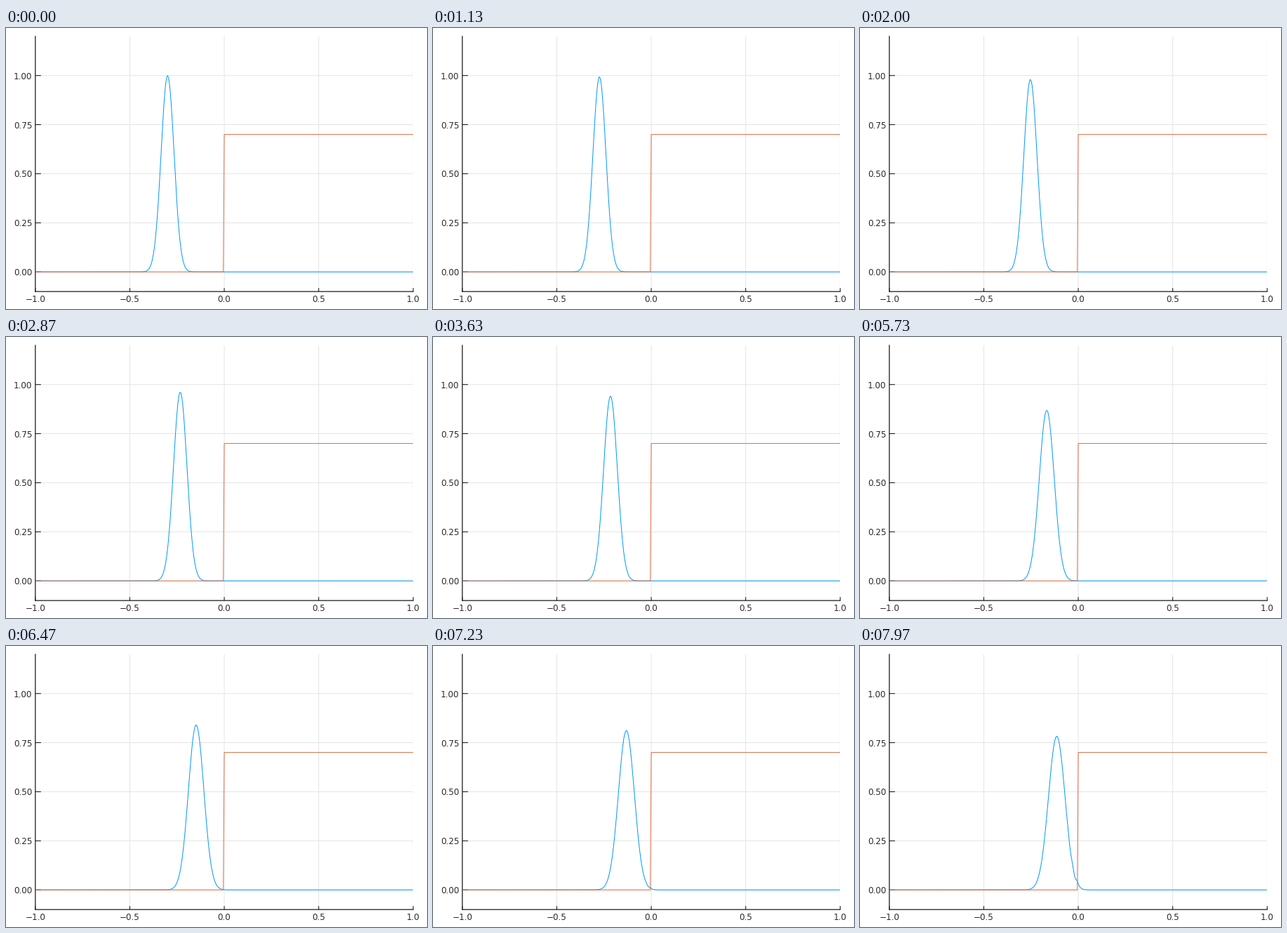
A matplotlib script for the animation above (8 s loop, 600 by 400 pixels).

```python
import numpy as np
import matplotlib.pyplot as plt
from matplotlib.animation import FuncAnimation

W, H, DPI = 600, 400, 100
FRAMES, LOOP = 240, 8000
PX = 72 / DPI                      # one pixel in points
LEFT, RIGHT, TOP, BOTTOM = 41.8, 580.3, 11.8, 375.15

BLUE, ORANGE, AXIS = "#009afa", "#e26f46", "#111111"

# Gaussian packet meeting a potential step (hbar = m = 1)
SIGMA, X0, K0 = 0.0484, -0.3, 100
EDGE = -0.0025                     # the step lies between two grid points
SPREAD_TIME = 10.02                # seconds until the width grows by sqrt(2)
x = np.linspace(-1, 1, 401)
k = np.linspace(0.2, 210, 700)
q = np.sqrt(k**2 - 0.7 * K0**2 + 0j)


def scattering_states():
    """Weighted stationary states, one column for each wave number."""
    d = (x - EDGE)[:, None]
    refl = (k - q) / (k + q)
    left = np.exp(1j * k * d) + refl * np.exp(-1j * k * d)
    right = (1 + refl) * np.exp(1j * q * np.maximum(d, 0))
    weight = np.exp(-((k - K0) * SIGMA) ** 2 / 2 - 1j * k * (X0 - EDGE))
    weight = weight * (k[1] - k[0]) * SIGMA / np.sqrt(2 * np.pi)
    return np.where(d < 0, left, right) * weight


states = scattering_states()


def density(seconds):
    t = SIGMA**2 * seconds / SPREAD_TIME
    return np.abs(states @ np.exp(-0.5j * k**2 * t)) ** 2


plt.rcParams["font.family"] = "DejaVu Sans"
plt.rcParams["path.snap"] = False
fig = plt.figure(figsize=(W / DPI, H / DPI), dpi=DPI, facecolor="white")
ax = fig.add_axes([LEFT / W, 1 - BOTTOM / H,
                   (RIGHT - LEFT) / W, (BOTTOM - TOP) / H])
ax.set(xlim=(-1, 1), ylim=(-0.1, 1.2))
ax.set_axisbelow(True)
ax.grid(color="#e5e5e5", linewidth=PX)

xticks = [-1, -0.5, 0, 0.5, 1]
yticks = [0, 0.25, 0.5, 0.75, 1]
ax.set_xticks(xticks, [f"{v:.1f}".replace("-", "\u2212") for v in xticks])
ax.set_yticks(yticks, [f"{v:.2f}" for v in yticks])
ax.tick_params(length=0, labelsize=12 * PX, labelcolor="#2a2a2a")
ax.tick_params(axis="x", pad=4.8 * PX)
ax.tick_params(axis="y", pad=4.5 * PX)

# Inward tick marks, 5 px high and 8 px wide
mark = dict(color=AXIS, linewidth=PX, clip_on=False)
ax.vlines(xticks, -0.1, -0.1 + 5 * 1.3 / (BOTTOM - TOP), **mark)
ax.hlines(yticks, -1, -1 + 8 * 2 / (RIGHT - LEFT), **mark)
for side, spine in ax.spines.items():
    spine.set_visible(side in ("left", "bottom"))
    spine.set_linewidth(1.2 * PX)
    spine.set_color(AXIS)

wave, = ax.plot(x, density(0), color=BLUE, lw=PX, zorder=3)
ax.plot(x, np.where(x > EDGE, 0.7, 0), color=ORANGE, lw=PX, zorder=4)


def update(frame):
    wave.set_ydata(density(frame * LOOP / FRAMES / 1000))
    return wave,


anim = FuncAnimation(fig, update, frames=FRAMES, interval=LOOP / FRAMES,
                     repeat=True, repeat_delay=0)
plt.show()
```
